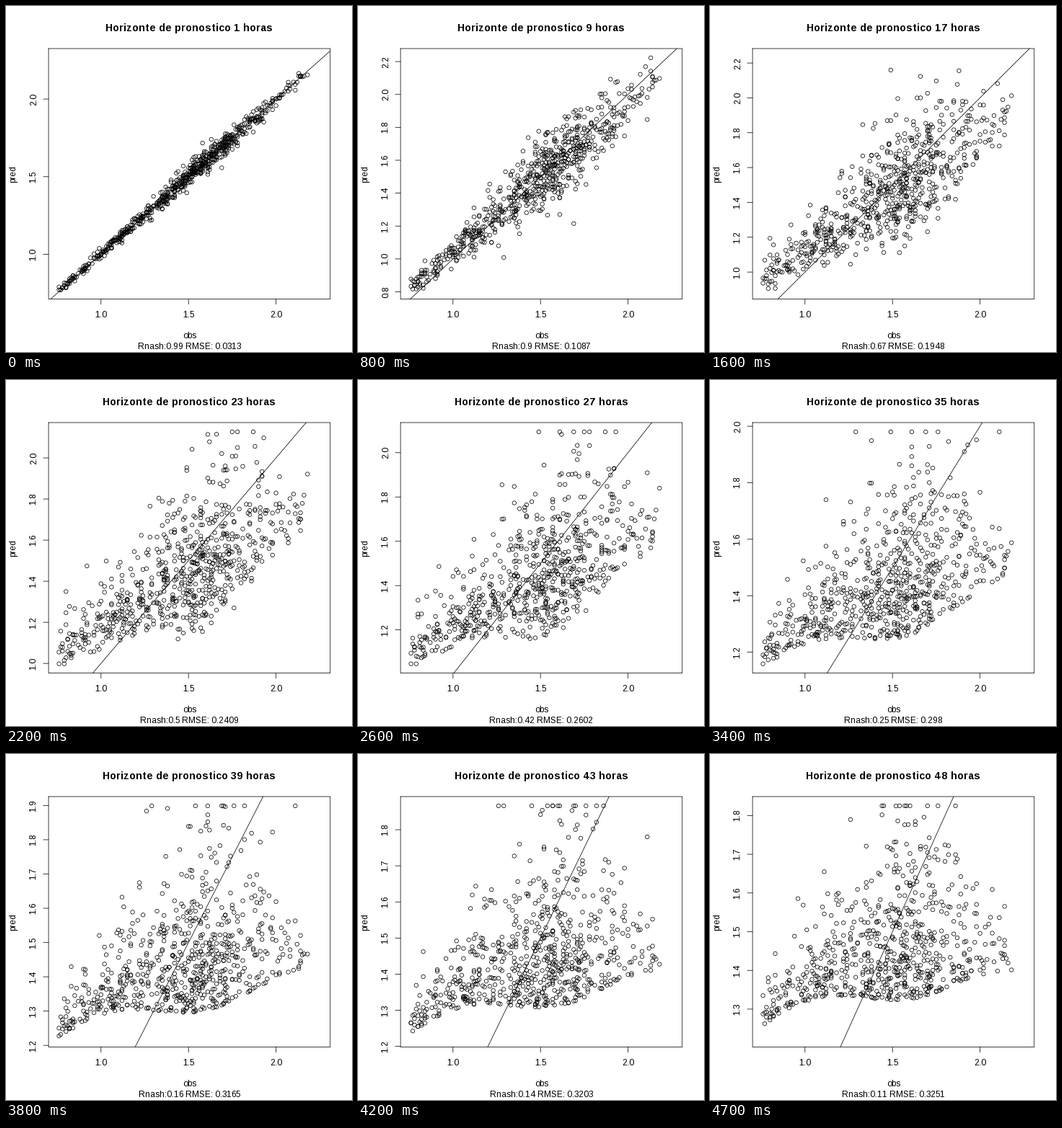
Recreate the animation shown at these times as a matplotlib script. Size 480x480 px, loop 4800 ms.

```python
import numpy as np
import matplotlib.pyplot as plt
from matplotlib.animation import FuncAnimation

SIZE, DPI = 480, 72
HOURS = 48
LINE = 14.4  # height of one margin line
LEFT, RIGHT = 4.1 * LINE, SIZE - 2.1 * LINE
TOP, BOTTOM = 4.1 * LINE, SIZE - 5.1 * LINE
XLIM = (0.7004, 2.3096)
COUNT = 700
MEAN, SPREAD = 1.47, 0.34
WEIGHT = 0.75

plt.rcParams["font.family"] = "Liberation Sans"
plt.rcParams["text.hinting_factor"] = 1

# Key horizons for the error and the vertical range
KEYS = [1, 9, 17, 23, 31, 39, 48]
RMSE = [0.0313, 0.1087, 0.1948, 0.2409, 0.2795, 0.3165, 0.3251]
LOW = [0.712, 0.756, 0.845, 0.953, 1.057, 1.195, 1.202]
HIGH = [2.325, 2.279, 2.283, 2.172, 2.100, 1.926, 1.849]

rng = np.random.default_rng(11)
core = COUNT * 35 // 100
obs = np.concatenate([0.76 + 1.49 * rng.beta(1.3, 1.6, COUNT - core),
                      rng.normal(1.56, 0.13, core)]).round(2)
noise_a, noise_b = rng.standard_normal((2, COUNT))


def skill(hour):
    """Error and share of explained variance of the forecast."""
    rmse = np.interp(hour, KEYS, RMSE)
    return rmse, 1 - rmse ** 2 / min(0.1125 + 0.00018 * hour, 0.119)


def predict(hour, nash):
    """Forecasts shrink towards the mean as their skill fades."""
    dx = obs - MEAN
    trend = MEAN + nash * dx - 0.2 * (1 - nash) * dx ** 2
    width = 0.3 + 0.9 * np.exp(-((obs - 1.6) / 0.45) ** 2)
    turn = 0.11 * hour
    z = noise_a * np.cos(turn) + noise_b * np.sin(turn)
    z += 0.3 * (1 - nash) * (z ** 2 - 1)
    return trend + SPREAD * np.sqrt(nash * (1 - nash)) * width * z


def ticks(lo, hi):
    span = hi - lo
    step = 0.5 if span > 1.556 else 0.2 if span > 0.778 else 0.1
    return np.arange(np.ceil(lo / step), np.floor(hi / step) + 1) * step


def sx(x):
    return LEFT + (x - XLIM[0]) / (XLIM[1] - XLIM[0]) * (RIGHT - LEFT)


fig = plt.figure(figsize=(SIZE / DPI, SIZE / DPI), dpi=DPI, facecolor="white")
ax = fig.add_axes([0, 0, 1, 1])


def stroke(xs, ys):
    ax.plot(xs, ys, color="black", lw=WEIGHT, snap=False,
            solid_capstyle="round", solid_joinstyle="round")


def label(x, y, text, size=12, **kw):
    ax.text(x, y, text, size=size, ha="center", va="baseline",
            rotation_mode="anchor", **kw)


def draw(frame):
    hour = frame + 1
    rmse, nash = skill(hour)
    lo, hi = np.interp(hour, KEYS, LOW), np.interp(hour, KEYS, HIGH)
    pad = (hi - lo) * 0.037

    def sy(y):
        return BOTTOM - (y - lo) / (hi - lo) * (BOTTOM - TOP)

    ax.clear()
    ax.set(xlim=(0, SIZE), ylim=(SIZE, 0))
    ax.axis("off")

    pred = np.clip(predict(hour, nash), lo + pad, hi - pad)
    ax.scatter(sx(obs), sy(pred), s=np.full(COUNT, 5.4 ** 2),
               facecolors="none", edgecolors="black", linewidths=WEIGHT)
    ends = np.array([max(lo, XLIM[0]), min(hi, XLIM[1])])
    stroke(sx(ends), sy(ends))
    stroke([LEFT, RIGHT, RIGHT, LEFT, LEFT], [TOP, TOP, BOTTOM, BOTTOM, TOP])

    for v in ticks(*XLIM):
        stroke([sx(v)] * 2, [BOTTOM, BOTTOM + LINE / 2])
        label(sx(v), BOTTOM + 1.8 * LINE, f"{v:.1f}")
    for v in ticks(lo, hi):
        stroke([LEFT - LINE / 2, LEFT], [sy(v)] * 2)
        label(LEFT - 1.2 * LINE, sy(v), f"{v:.1f}", rotation=90)

    mid_x, mid_y = (LEFT + RIGHT) / 2, (TOP + BOTTOM) / 2
    label(mid_x, 35, f"Horizonte de pronostico {hour} horas", LINE, weight="bold")
    label(mid_x, BOTTOM + 3.8 * LINE, "obs")
    label(mid_x, BOTTOM + 4.8 * LINE, f"Rnash:{round(nash, 2):g} RMSE: {round(rmse, 4):g}")
    label(LEFT - 3.2 * LINE, mid_y, "pred", rotation=90)


anim = FuncAnimation(fig, draw, frames=HOURS, init_func=lambda: None,
                     interval=100, repeat=True, repeat_delay=0)
plt.show()
```
